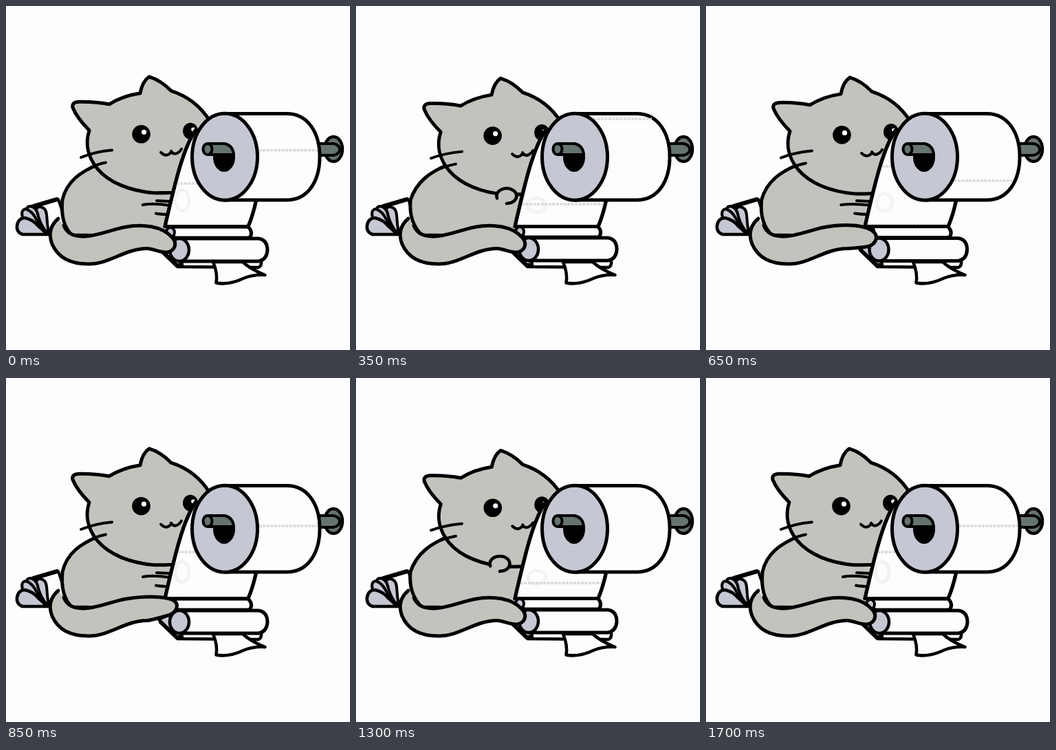
An HTML page with a canvas that plays this animation: 500 by 500 pixels, repeating every 1.75 s.

```html
<!DOCTYPE html>
<html lang="en">
<head>
<meta charset="utf-8">
<title>Cat and paper roll</title>
<style>
html, body { margin: 0; width: 100%; height: 100%; overflow: hidden; background: #fdfcff; }
canvas { display: block; width: 100vw; height: 100vh; }
</style>
</head>
<body>
<canvas id="stage" width="500" height="500"></canvas>
<script>
const ctx = document.getElementById('stage').getContext('2d');
const FUR = '#c3c2bc', PAPER = '#fdfcff', LILAC = '#c5c7d3', STEEL = '#66746f', INK = '#000000';
const STEP = 50, FRAMES = 35, CYCLE = 17;

const clamp = v => Math.max(0, Math.min(1, v));
const smooth = v => v * v * (3 - 2 * v);
const mix = (a, b, u) => a + (b - a) * u;

function paint(path, fill, width = 5) {
  if (fill) { ctx.fillStyle = fill; ctx.fill(path); }
  if (width) { ctx.strokeStyle = INK; ctx.lineWidth = width; ctx.stroke(path); }
}
const shape = (d, fill, width) => paint(new Path2D(d), fill, width);

function oval(x, y, rx, ry, fill, width = 5) {
  const path = new Path2D();
  path.ellipse(x, y, rx, ry, 0, 0, Math.PI * 2);
  paint(path, fill, width);
}

function perforation(x1, x2, y) {
  ctx.save();
  ctx.lineCap = 'butt';
  ctx.setLineDash([4, 1.5]);
  ctx.strokeStyle = '#d9d9db';
  ctx.lineWidth = 3.4;
  ctx.beginPath();
  ctx.moveTo(x1, y);
  ctx.lineTo(x2, y);
  ctx.stroke();
  ctx.restore();
}

function backFolds() {
  shape('M40 292L76 281L94 335L60 332Z', PAPER, 4);
  shape('M62 331Q46 318 43 302Q43 291 50 292Q58 293 59 303Q60 318 62 331Z', LILAC, 4);
  shape('M61 331Q38 312 31 300Q28 291 36 291Q45 293 47 306Q52 322 61 331Z', LILAC, 4);
  shape('M60 331Q30 318 24 307Q21 296 29 295Q38 298 44 310Q52 324 60 331Z', LILAC, 4);
  shape('M60 332L24 332Q15 329 16 319Q18 308 28 308Q40 311 46 319Q54 326 60 332Z', LILAC, 4.5);
  shape('M40 291L74 281', null, 6);
}

function body(s) {
  const x = 82 - 3 * s;
  shape(`M135 230C108 241 88 255 ${x} 282C${x - 2} 305 84 322 96 333L238 335L250 250Z`, FUR);
}

function head(s) {
  ctx.save();
  ctx.translate(2.3 * s, 0.7 + 2.6 * s);
  shape('M121 180Q103 162 97 147Q95 139 106 138.500Q130 138 150 142Q169 130 195 126' +
    'Q198 109 208 102Q225 107 240 122.500Q276 134 296 166L300 265L243 270.500' +
    'Q230 271 215 271C180 268 150 256 133 236C118 218 115 198 121 180Z', FUR);
  oval(196.5, 185.5, 13.3, 13.3, INK, 0);
  oval(200.5, 182.500, 3.6, 3.6, PAPER, 0);
  oval(268, 181, 11, 12, INK, 0);
  oval(272, 178.500, 2.8, 2.8, PAPER, 0);
  shape('M225 212Q231 218 236 215Q240 213 240 210Q243 216 249 213Q253 211 255 207', null, 4);
  ctx.restore();
  const dy = 2.3 * s;
  shape(`M109 ${220 + dy * 0.6}Q128 ${212 + dy} 154 ${209.5 + dy}`, null, 4);
  shape(`M121 ${236 + dy * 0.3}Q132 ${230 + dy} 145 ${227.5 + dy}`, null, 4);
}

function arm(p, s) {
  const a = 2 * Math.PI * (p - 9) / CYCLE;
  const x = 247 - 38 * Math.cos(a);
  const lift = ((1 + Math.cos(a)) / 2) ** 2;
  const y = 295 - 25 * lift;
  if (lift < 0.3) {
    const k = 4 * s;
    shape(`M${199 - 1.5 * k} 289Q214 ${286 + k * 0.3} 238 ${290 - k * 0.3}`, null, 4);
    shape('M219 283L238 284', null, 4);
    shape(`M${218 - k} 301.500Q226 303 238 303`, null, 4);
    return;
  }
  oval(x, y, 14.5, 11, FUR, 0);
  const paw = new Path2D();
  paw.ellipse(x, y, 14.5, 11, 0, Math.PI * 0.9, Math.PI * 2.36);
  paw.lineTo(x, y + 11);
  paint(paw, null, 4.5);
}

function foldedPaper(s) {
  shape('M224 355L249 379L367 380Q372 378 371 370L250 345Z', PAPER, 4.5);
  shape('M222 351L248 376L256 376L248 338Z', LILAC, 4.5);
  shape('M301 372Q308 389 305.500 402.500Q324 406 346 395.500Q360 390 376.500 391Q356 383 344 372Z',
    PAPER, 4.5);
  ctx.save();
  ctx.translate(-s, -s);
  shape('M236 321L352 321Q360 329 354 337L245 337Z', PAPER);
  oval(239, 329, 6, 7, LILAC, 4);
  shape('M248 338L367 338Q380 340 380 355Q379 369 367 371L252 371Z', PAPER);
  oval(252, 354.5, 14, 16.5, LILAC, 4.5);
  ctx.restore();
}

function sheet(p, s) {
  const path = new Path2D('M276 180C258 205 246 255 231 320.500L352 320.500Q359 304 363.500 283L320 220Z');
  paint(path, PAPER);
  ctx.save();
  ctx.clip(path);
  ctx.strokeStyle = 'rgba(0,0,0,0.04)';
  ctx.lineWidth = 5;
  ctx.beginPath();
  ctx.ellipse(256 + 7 * s, 282 + 8 * s, 10 + 3 * s, 15 - 5 * s, 0, 0, Math.PI * 2);
  ctx.stroke();
  const y = 253 + 5 * p;
  if (y < 320) perforation(mix(249, 239, (y - 253) / 45), 361, y);
  if (p > 9) perforation(mix(249, 260, (CYCLE - p) / 7), 361, y - 5 * CYCLE);
  ctx.restore();
  paint(path, null);
}

function roll(p) {
  oval(476, 208, 13, 18, STEEL, 4.5);
  shape('M450 200L476 200Q485 202 485 208.500Q485 215 476 217L450 217Z', STEEL, 4);
  shape('M318 156.500L408 156.500C440 156.500 456 186 456 219C456 253 440 282 408 282L318 282Z', PAPER);
  const y = p < 10 ? 215 - 5 * p - 0.32 * p * p : 283 - 9.7 * (p - 10);
  if (p < 8.5 || p > 10) {
    const reach = 48 * Math.sqrt(Math.max(0, 1 - ((y - 219) / 64) ** 2));
    perforation(320 + reach, 405 + reach, y);
  }
  oval(318, 219.3, 47.5, 63, LILAC);
  oval(317, 220, 16, 21, INK, 0);
  shape('M293 200L318 200Q330 203 331 216L293 216Z', STEEL, 4);
  oval(293, 208, 6.5, 8, STEEL, 4);
}

function tail(u) {
  const m = (a, b) => mix(a, b, u);
  shape('M76 309C63 320 62 333 67 346C76 367 96 375 120 375C151 375 172 353 205 352.500' +
    `C${m(214, 212)} ${m(352.5, 352)} ${m(224, 228)} ${m(359, 347)} ${m(234, 236)} ${m(358, 345)}` +
    `C${m(246, 246)} ${m(356, 342)} ${m(249, 252)} ${m(345, 332)} ${m(242, 246)} ${m(337, 325)}` +
    `C${m(228, 236)} ${m(320, 317)} ${m(198, 204)} 316 172 321.5` +
    'C150 326 132 335 112 335C97 335 88 330 84 319', FUR);
}

function draw(frame) {
  // The first beats ease into the repeating cycle.
  const p = frame < 4 ? 1 + 0.75 * frame : frame % CYCLE;
  const s = (1 - Math.cos(2 * Math.PI * p / CYCLE)) / 2;
  const flick = smooth(clamp(Math.min((frame - 10) / 5, (26 - frame) / 4)));
  ctx.fillStyle = PAPER;
  ctx.fillRect(0, 0, 500, 500);
  ctx.lineCap = ctx.lineJoin = 'round';
  backFolds();
  body(s);
  head(s);
  arm(p, s);
  foldedPaper(s);
  sheet(p, s);
  roll(p);
  tail(flick);
}

const start = performance.now();
function tick() {
  draw(Math.floor((performance.now() - start) / STEP) % FRAMES);
  requestAnimationFrame(tick);
}
tick();
</script>
</body>
</html>
```
